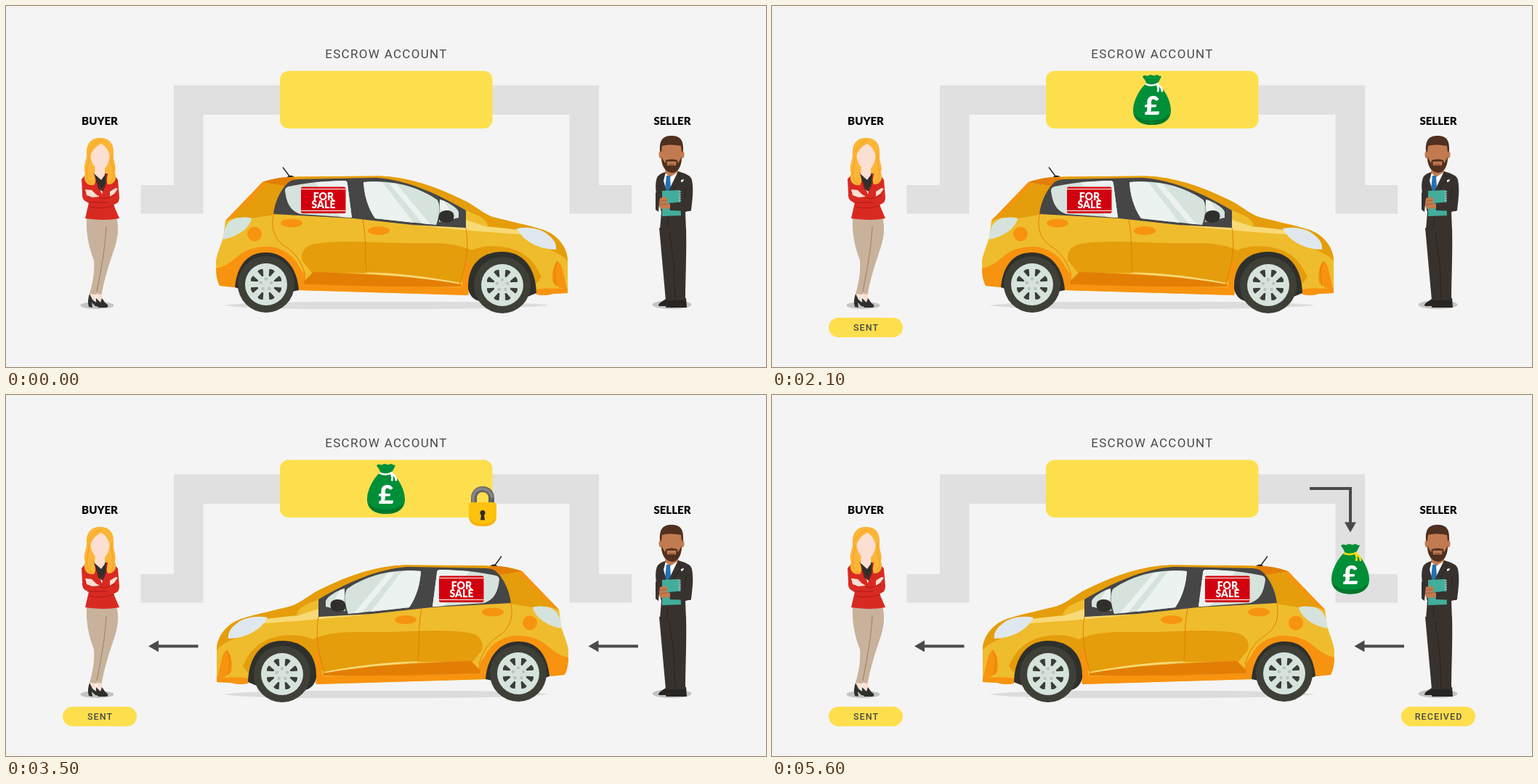
These frames come from a looping animation (1046 by 498 pixels, 7 s). An HTML page with a canvas:

```html
<!DOCTYPE html>
<html lang="en">
<head>
<meta charset="utf-8">
<title>Escrow account</title>
<style>
html, body { margin: 0; width: 100%; height: 100%; overflow: hidden; background: #f4f4f4; }
canvas { display: block; width: 1046px; height: 498px; }
</style>
</head>
<body>
<canvas id="stage" width="1046" height="498"></canvas>
<script>
const ctx = document.getElementById('stage').getContext('2d');
const LOOP = 7000, STEP = 700;
const YELLOW = '#fddf4e', INK = '#4a4a4a', GLASS = '#d5e3dc', SHEEN = '#ecf2ef';
const PAINT = '#efbc2d', AMBER = '#e59d0b', ORANGE = '#f7930f', RUST = '#e37e05', PALE = '#f8da76';
const BLACK = '#2f302c';

function fill(color, d) {
  ctx.fillStyle = color;
  ctx.fill(new Path2D(d));
}

function line(color, width, d) {
  ctx.strokeStyle = color;
  ctx.lineWidth = width;
  ctx.stroke(new Path2D(d));
}

function oval(color, x, y, rx, ry = rx) {
  ctx.fillStyle = color;
  ctx.beginPath();
  ctx.ellipse(x, y, rx, ry, 0, 0, Math.PI * 2);
  ctx.fill();
}

function box(color, x, y, w, h, r) {
  ctx.fillStyle = color;
  ctx.beginPath();
  ctx.roundRect(x, y, w, h, r);
  ctx.fill();
}

function text(str, x, y, font, color, gap = 0) {
  ctx.font = font;
  ctx.fillStyle = color;
  ctx.letterSpacing = gap + 'px';
  ctx.textAlign = 'center';
  ctx.fillText(str, x + gap / 2, y);
}

function at(x, y, draw) {
  ctx.save();
  ctx.translate(x, y);
  draw();
  ctx.restore();
}

function backdrop() {
  ctx.fillStyle = '#f4f4f4';
  ctx.fillRect(0, 0, 1046, 498);
  fill('#e0e0e0', 'M185.5 247H231V109.5H816V247H861V286.5H775.5V150H271.5V286.5H185.5Z');
  box(YELLOW, 377, 89.5, 292.5, 79.5, 12);
  text('ESCROW ACCOUNT', 522.8, 72, '17px Roboto, sans-serif', INK, 1.3);
  text('BUYER', 129, 164, '900 15px Lato, sans-serif', '#000');
  text('SELLER', 917, 164, '900 15px Lato, sans-serif', '#000');
}

function pill(str, x) {
  box(YELLOW, x, 430, 102, 27, 13.5);
  text(str, x + 51, 448, '500 12.5px Roboto, sans-serif', INK, 1.1);
}

function leftArrow(x) {
  fill(INK, `M${x} 346.5l14 -8v6h54.5v4h-54.5v6z`);
}

function buyer() {
  const hair = '#fbb537', lock = '#f5a122', skin = '#fbdfd2', red = '#d92a22', deep = '#ad1a18';
  const cloth = '#c9b29b', crease = '#a3886f';
  oval('#c4c4c4', 125.5, 413, 23, 5);
  fill(skin, 'M116 397L124 397 121 408 115 405ZM125 394L132 394 132 408 126 407Z');
  fill(cloth, 'M127 291H152C156 306 154 322 148 338C142 356 135 378 131.5 398L124 396C127 375 129 340 127 291Z');
  fill(cloth, 'M111 291H142L131 365 125 398 115 397C120 380 122 365 121 351C113 330 110 312 111 291Z');
  line(crease, 1.3, 'M138 305C137 325 134 345 131 362L125 394');
  fill(BLACK, 'M115 397C113 403 112 409 114 415L119 416 118 409 123 414 133 416C130 411 123 409 119 405Z');
  fill(BLACK, 'M124 403C123 407 125 410 127 416H137C142 416 141 412 137 410L132 403 130 409Z');
  fill(hair, 'M130 182C116 181 110 192 111 204C111 214 105 222 109 231C103 240 110 249 119 248H142C151 246 153 238 149 231C154 224 147 215 148 204C149 191 143 182 130 182Z');
  fill(red, 'M104 239C107 234 114 232 121 230L132 260 138 231C146 232 152 235 154 240L156 264C156 270 153 273 148 274L156 293C140 296 123 295 109 293L114 271C108 270 104 266 105 258Z');
  fill(BLACK, 'M121 232L138 231 137 248 133 256 127 252Z');
  fill(skin, 'M123 218H136V233L131 240 122 232Z');
  line(deep, 1, 'M108 257L135 266 150 261M112 271L140 271M115 277C127 280 136 279 149 275M121 233L126 246 132 254 138 244 138 232');
  fill(skin, 'M109 253L118 254 124 260 129 263 119 264 111 261ZM143 256L151 251 154 252 149 259 143 263Z');
  fill(hair, 'M117 198C112 210 116 219 109 231C105 241 112 249 121 247C127 239 119 231 118 220ZM143 198C148 210 144 219 150 230C154 240 147 247 140 246C136 238 143 230 142 217Z');
  line(lock, 1.2, 'M114 204C115 217 109 228 112 238C113 243 119 242 118 247M146 204C143 216 149 226 148 235C148 240 142 241 144 246');
  fill(skin, 'M116.5 207C116 194 122 188 130 188C138 188 143 195 142.5 207C142 219 135 227 130 227C124 226 117 217 116.5 207Z');
  fill(hair, 'M115 211C111 192 119 183 131 183C143 184 148 197 144 211C142 203 140 195 131 190C122 194 117 202 115 211Z');
  line(lock, 1, 'M131 186C122 188 117 195 114 202');
}

function seller() {
  const skin = '#c27b50', hair = '#50301f', suit = '#38322e', dark = '#292522', teal = '#43ad9b';
  oval('#c4c4c4', 916.5, 412, 27, 6);
  fill(dark, 'M898 413C899 408 906 407 909 403H922V414H899ZM908 416C908 411 916 410 920 403H936L937 416Z');
  fill(suit, 'M899 306H936C937 340 935 375 935 406H908Z');
  line(dark, 1.2, 'M913 312L919 355 921 406');
  fill('#fff', 'M906 228H926L920 259H908Z');
  fill(skin, 'M908 222H925V229L914 236 907 230Z');
  fill('#1f73b7', 'M909 234L914 234 915 252 911 258 907 252Z');
  fill(suit, 'M897 235C901 231 904 230 908 229L905 241 910 259 925 228C935 231 943 234 944 240C947 255 944 270 943 282L935 284 936 311C924 313 910 311 900 308L902 284 896 264C893 250 894 240 897 235Z');
  line(dark, 1, 'M925 229L929 239 924 244 915 263M936 250L934 270M911 290L910 307');
  fill('#fff', 'M929 240L933 239 932 242 929 243Z');
  fill(teal, 'M903 255L927 254 929 289 903 290Z');
  for (let y = 256; y < 272; y += 3) line('#e6f2ef', 1, `M926 ${y}h3`);
  fill(suit, 'M933 265L944 266 942 283 914 282 912 272 933 270Z');
  fill(skin, 'M900 265L908 263 911 268 909 272 914 273 914 279 901 280 898 274Z');
  line('#985735', .8, 'M901 269L909 268M900 274L910 273');
  fill(suit, 'M894 257L900 262 898 284 894 281Z');
  oval(skin, 901, 205, 2.5, 5);
  oval(skin, 931, 205, 2.5, 5);
  fill(skin, 'M902 193C904 186 928 186 930 193L930 212C928 224 922 229 916 229C909 228 903 222 902 211Z');
  fill(hair, 'M900 200C899 184 905 179 916 179C927 179 933 184 932 200L930 202 929 193C920 191 911 191 903 193L902 202Z');
  fill(hair, 'M902 208L907 217L908 213C911 211 921 211 924 213L925 217 930 208C930 223 924 230 916 230C908 229 902 222 902 208Z');
  fill(skin, 'M909.5 214.5H922.5L922 220H910Z');
  line('#7d432d', 1, 'M912 218.5H920');
}

function wheel(x, y) {
  oval('#3e4038', x, y, 39);
  oval(GLASS, x, y, 29);
  for (let i = 0; i < 8; i++) {
    at(x, y, () => {
      ctx.rotate((i + .5) * Math.PI / 4);
      fill('#3b3d37', 'M-1 -12L-4 -21Q0 -23.5 4 -21L1 -12Z');
    });
  }
  for (let i = 0; i < 5; i++) {
    const a = i * Math.PI * .4 - Math.PI / 2;
    oval('#a5b1ac', x + 7.5 * Math.cos(a), y + 7.5 * Math.sin(a), 2);
    oval('#c2cfc9', x + 7.5 * Math.cos(a), y + 7.5 * Math.sin(a), 1.3);
  }
}

function car() {
  // antenna and body shell
  line('#222', 1.4, 'M381 222.5L391 236');
  fill('#222', 'M386 238C387 233 394 232 398 237Z');
  fill(PAINT, 'M289 352C290 343 294 335 299 319L302 296 353 243C373 236 390 236 402 235.5L515 234.5C552 236 590 248 630 268C648 277 656 286 670 291C692 297 718 302 740 309C762 317 773 336 773 350L773 396 733 398 722 375 644 375 636 399 402 392 315 388 294 386C290 378 289 365 289 352Z');
  fill(AMBER, 'M302 296L353 243C373 236 390 236 402 235.5L515 234.5C552 236 590 248 630 268C648 277 656 286 670 291C692 297 718 302 740 309C762 317 773 336 773 352C765 341 747 337 733 328L706 309C690 307 677 305 663 305L631 281C588 257 550 240 510 238L400 240 386 247C376 258 371 272 368 288L338 293 316 292Z');
  fill(ORANGE, 'M302 297L353 243 359 244 311 293Z');
  fill(RUST, 'M353 243C370 237 382 236 391 236L401 239C392 240 388 243 384 248Z');
  fill(PALE, 'M470 290C540 292 600 295 634 294L631 286 662 304 706 309 710 315C640 311 560 303 470 290Z');
  fill(PAINT, 'M631 281L652 290C660 295 663 300 663 305L633 295Z');

  // lower shading
  fill(AMBER, 'M408 352C405 341 410 331 425 328C465 322 505 327 550 327C590 327 615 325 641 337C658 329 681 330 700 336C721 345 730 358 737 374L730 383 640 370 625 382 495 368 422 369Z');
  fill(ORANGE, 'M289 362C301 360 311 352 319 345C332 334 348 332 361 332C382 333 398 347 403 359L412 372 412 384 627 388 634 352 639 356 636 399 402 392 315 388 294 386C290 378 289 370 289 362Z');
  fill(RUST, 'M410 380L423 367C490 369 560 373 625 382L627 387C555 388 480 386 411 384Z');
  fill(PALE, 'M495 367.5C540 368 585 374 625 382L624 383.5C580 376 540 372 495 369Z');
  fill(ORANGE, 'M729 391C745 388 760 391 773 389L773 396 753 397C745 400 735 399 730 398ZM753 382C751 370 752 360 759 352C766 355 767 370 772 390L762 389Z');
  line(RUST, 1.2, 'M759 352C753 362 755 374 757 386');

  // wheel arches
  fill(BLACK, 'M315 388C318 358 332 340 358 340C384 340 401 362 403 392L384 396 331 394Z');
  fill(BLACK, 'M636 390C635 357 654 339 683 339C711 339 729 360 730 396L718 401 651 407C643 405 638 399 636 390Z');

  // windows
  fill('#464646', 'M368 287C370 270 378 254 386 246C391 240 395 240 402 239L510 237C552 240 592 258 633 282L633 306 560 302 478 293Z');
  fill(GLASS, 'M384 255C384 250 388 249 394 248C420 243 445 241 465 241C469 241 470 243 470 246L476 292 405 287C390 282 386 270 384 255Z');
  fill(SHEEN, 'M425 243L465 241C469 241 470 243 470 246L476 292 460 291Z');
  fill(GLASS, 'M492 243C540 239 572 253 593 267C598 272 597 289 592 302L508 293C497 277 493 259 492 243Z');
  fill(SHEEN, 'M492 243C501 242 510 242 518 243L561 299 508 293C497 277 493 259 492 243ZM527 244L538 246 584 301 573 300Z');
  fill(GLASS, 'M597 267C608 270 621 278 623 284L623 292 596 298Z');
  fill(SHEEN, 'M597 267L603 269 618 293 608 295 597 279Z');
  fill(BLACK, 'M597 286C600 281 614 280 616 287C618 294 614 299 605 299L598 297C595 295 595 290 597 286Z');

  // seams, handles and lamps
  line(RUST, 1, 'M369 286C363 306 370 323 386 333C399 341 407 355 412 371M491 295C496 318 494 344 496 368M633 306C637 329 634 355 625 382');
  oval(ORANGE, 393, 299.5, 15, 6);
  oval(ORANGE, 513, 310, 15, 6);
  oval(ORANGE, 342, 314.5, 10);
  fill(GLASS, 'M299 322C299 306 305 296 316 293C325 291 334 291 338 293C336 304 323 317 299 322Z');
  fill('#dfe8ee', 'M703 307C718 304 735 307 744 314C754 321 758 328 757 336C735 336 712 325 703 307Z');
  wheel(358, 384);
  wheel(683, 385);
}

function sign(x) {
  box('#d2000f', x - 31, 249.5, 61.5, 36.5, 2.5);
  ctx.fillStyle = '#fff';
  ctx.fillRect(x - 31, 252, 61.5, 1);
  ctx.fillRect(x - 31, 282, 61.5, 1);
  const font = '900 14px Lato, sans-serif';
  text('FOR', x, 267.5, font, '#fff');
  text('SALE', x, 278.5, font, '#fff');
}

function vehicle(flipped) {
  fill('#dcdcdc', 'M299 413C340 407 440 408 523 408C620 408 720 408 747 413C700 418 600 418 523 418C440 418 340 419 299 413Z');
  ctx.save();
  if (flipped) ctx.transform(-1, 0, 0, 1, 1063, 0);
  car();
  ctx.restore();
  sign(flipped ? 627 : 437);
}

// Money bag, origin at its centre
function bag(x, y, tie) {
  at(x, y, () => {
    fill('#008f39', 'M-8 -23C-9 -28 -12 -30 -13 -32C-9 -36 -7 -31 -4 -34C-1 -36 2 -32 5 -34C8 -36 9 -32 13 -33C12 -29 9 -26 8 -22C18 -14 26 2 26 14C26 29 14 34.5 0 34.5C-14 34.5 -26 29 -26 14C-26 2 -18 -14 -8 -23Z');
    fill('#00772b', 'M-25.5 18C-19 31 16 33 25.5 18C23 30 13 34.5 0 34.5C-13 34.5 -23 30 -25.5 18Z');
    line(tie, 2.6, 'M-9 -22C-3 -19 4 -20 9 -23M7 -21C13 -19 14 -15 14 -11M7 -21C9 -17 9 -14 8 -11');
    text('£', 0, 20.5, '900 36px Lato, sans-serif', '#fff');
  });
}

function lock() {
  line('#626262', 8, 'M644 153V142C644 126 668 126 668 142V153');
  line('#858585', 4, 'M643 153V142C643 125 667 125 669 142');
  fill('#fdc20d', 'M637 152Q637 148 642 148H670Q675 148 675 152V166C675 178 667 181 656 181C645 181 637 178 637 166Z');
  fill('#f7b20a', 'M637 168C642 181 669 181 675 168C674 178 667 181 656 181C645 181 638 178 637 168Z');
  oval('#2e2a22', 656, 162.5, 3.5);
  fill('#2e2a22', 'M654.5 163H657.5L659 172.5H653Z');
}

function draw(now) {
  const step = Math.floor((now % LOOP) / STEP);
  backdrop();
  buyer();
  seller();
  vehicle(step >= 5);

  if (step >= 1) pill('SENT', 78);
  if (step === 2) fill(INK, 'M249 187V129H297.5V123L311.5 131 297.5 139V133H253V187Z');
  if (step === 1 || step === 2) bag(251, 240, '#fce10c');
  if (step >= 3 && step <= 6) bag(523, 129.5, '#fff');
  if (step === 4 || step === 5) lock();
  if (step >= 5) {
    leftArrow(196);
    leftArrow(801.5);
  }
  if (step >= 7) fill(INK, 'M740 127H798V175.5H804L796 189.5 788 175.5H794V131H740Z');
  if (step >= 8) {
    bag(796, 240, '#fce10c');
    pill('RECEIVED', 866);
  }
}

const start = performance.now();
function tick() {
  draw(performance.now() - start);
  requestAnimationFrame(tick);
}
tick();
</script>
</body>
</html>
```
